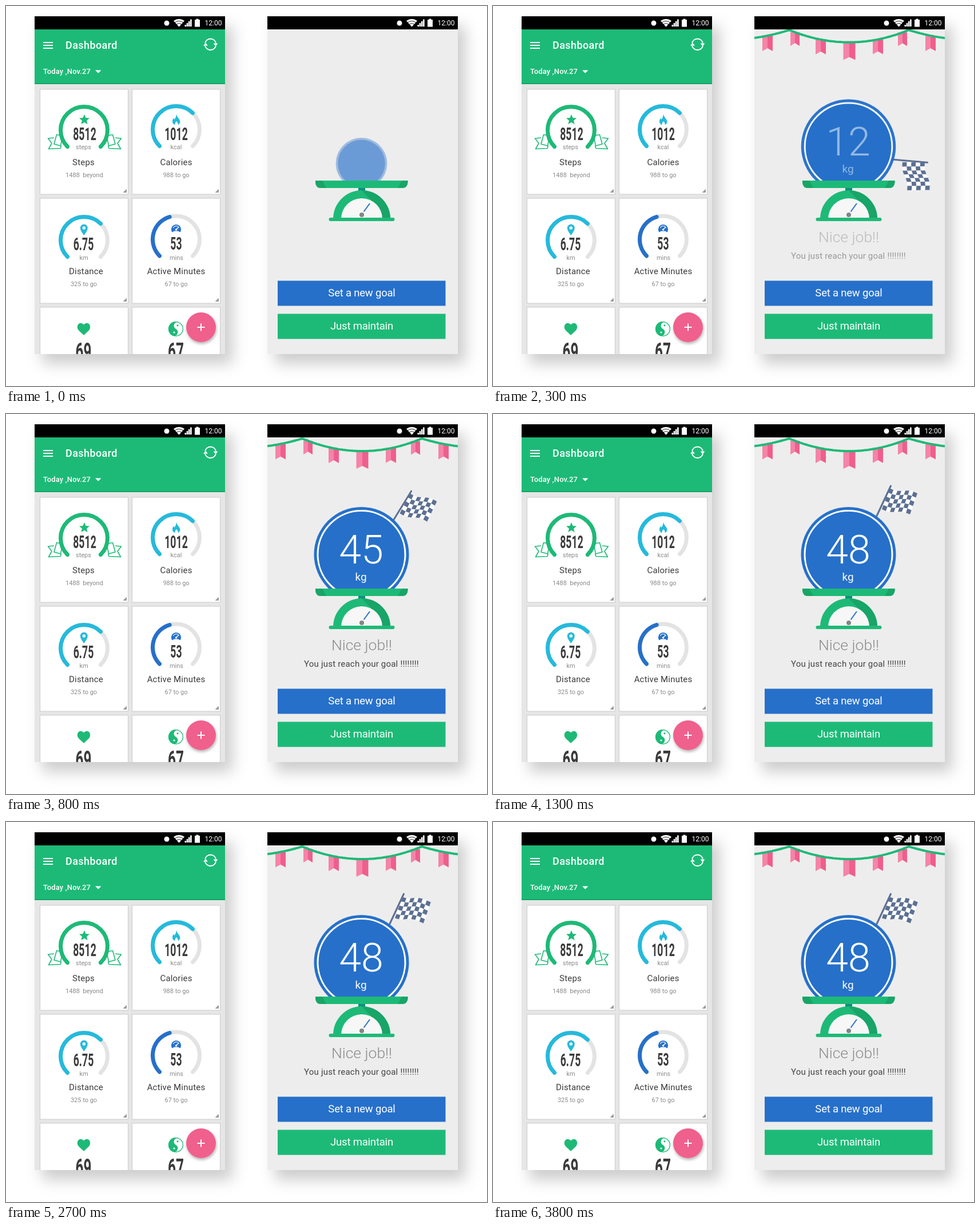
An HTML page that plays this animation: 841 px wide and 666 px high, repeating every 4000 ms.

```html
<!DOCTYPE html>
<html lang="en">
<head>
<meta charset="utf-8">
<title>Fitness dashboard</title>
<style>
html, body { margin: 0; width: 100%; height: 100%; overflow: hidden; background: #fff; }
svg { display: block; width: 841px; height: 666px; font-family: Roboto, "Open Sans", sans-serif; }
</style>
</head>
<body>
<svg id="stage" viewBox="0 0 841 666" xmlns="http://www.w3.org/2000/svg"></svg>
<script>
const GREEN = '#1dba77', DARK_GREEN = '#18a567', BLUE = '#2670ca', CYAN = '#25badb', INK = '#3b3b3b';
const stage = document.getElementById('stage');

const rect = (x, y, w, h, fill, extra = '') =>
  `<rect x="${x}" y="${y}" width="${w}" height="${h}" fill="${fill}" ${extra}/>`;
const circle = (x, y, r, fill, extra = '') =>
  `<circle cx="${x}" cy="${y}" r="${r}" fill="${fill}" ${extra}/>`;
const path = (d, fill = 'none', extra = '') => `<path d="${d}" fill="${fill}" ${extra}/>`;
const stroke = (d, color, width, extra = '') =>
  path(d, 'none', `stroke="${color}" stroke-width="${width}" ${extra}`);
const text = (x, y, size, fill, str, extra = '') =>
  `<text x="${x}" y="${y}" font-size="${size}" fill="${fill}" xml:space="preserve" ${extra}>${str}</text>`;
const MID = 'text-anchor="middle"';
const SPACED = MID + ' letter-spacing=".2"';

// Condensed figures used on the cards
const figure = (x, y, size, str) =>
  `<text transform="translate(${x} ${y}) scale(.58 1)" font-size="${size}" font-weight="700" fill="${INK}" ${MID}>${str}</text>`;

function polar(cx, cy, r, deg) {
  const a = deg * Math.PI / 180;
  return [cx + r * Math.cos(a), cy + r * Math.sin(a)];
}

function arc(cx, cy, r, from, to) {
  const big = to - from > 180 ? 1 : 0;
  return `M${polar(cx, cy, r, from)}A${r} ${r} 0 ${big} 1 ${polar(cx, cy, r, to)}`;
}

function gauge(cx, cy, end, color) {
  const cap = 'stroke-linecap="round"';
  return stroke(arc(cx, cy, 41, 135, 405), '#e3e3e3', 7, cap) +
    stroke(arc(cx, cy, 41, 135, end), color, 7, cap);
}

function star(cx, cy, r) {
  const pts = [];
  for (let i = 0; i < 10; i++) pts.push(polar(cx, cy, i % 2 ? r * .45 : r, i * 36 - 90));
  return `<polygon points="${pts.join(' ')}" fill="${GREEN}"/>`;
}

function statusBar(x) {
  let bars = '';
  for (let i = 0; i < 4; i++) bars += rect(x + 262.5 + i * 3.2, 33 - i * 3.2, 2.6, 3 + i * 3.2, '#fff');
  return rect(x, 18, 333, 23, '#000') +
    circle(x + 231, 30, 4.5, '#fff') +
    path(`M${x + 252.5} 36.5L${x + 243} 26Q${x + 252.5} 19.5 ${x + 262} 26Z`, '#fff') +
    stroke(`M${x + 245} 29.2Q${x + 252.5} 23.4 ${x + 260} 29.2M${x + 248} 32.4Q${x + 252.5} 28.8 ${x + 257} 32.4`, '#000', .9) +
    bars +
    rect(x + 282.5, 22.5, 4, 2, '#fff') + rect(x + 280, 24, 9, 12.5, '#fff') +
    text(x + 297.5, 34, 12, '#fff', '12:00');
}

function card(x, y) {
  return rect(x + .5, y + .5, 154, 184, '#fff', 'stroke="#cbcbcb"') +
    path(`M${x + 152} ${y + 175}v6.5h-6.5Z`, '#9a9a9a');
}

function label(x, y, title, subX, sub) {
  return text(x, y, 15, INK, title, SPACED) + text(subX, y + 21, 11, '#8a8a8a', sub, MID);
}
const unit = (x, y, str) => text(x, y, 11, '#8a8a8a', str, MID);

function ribbon() {
  const half = 'M84 231L73.5 232L80 240.5L74.5 250.5L95 249.5L96.5 245' +
    'M88.5 225.5L99 227.5L95.5 245L84 242Z';
  const line = stroke(half, GREEN, 1.6, 'stroke-linejoin="round"');
  return line + `<g transform="translate(275 0) scale(-1 1)">${line}</g>`;
}

function header() {
  let menu = '';
  for (let i = 0; i < 3; i++) menu += rect(65, 63 + i * 5, 17, 2, '#fff');
  const sync = stroke(arc(357.5, 67.3, 9.8, 195, 345) + arc(357.5, 67.3, 9.8, 15, 165), '#fff', 2) +
    path('M345 69.5h8l-4-5ZM362.5 65.5h8l-4 5Z', '#fff');
  return rect(50, 41, 333, 96, GREEN) + rect(50, 135, 333, 2, '#16a468') + menu + sync +
    text(104, 75, 18, '#fff', 'Dashboard', 'font-weight="500" letter-spacing=".4"') +
    text(65, 119, 13, '#fff', 'Today ,Nov.27', 'font-weight="500" letter-spacing=".15"') +
    path('M156 112.5h10.5l-5.25 5.2Z', '#fff');
}

function dashboard() {
  let cards = '';
  for (const y of [146, 337, 528]) cards += card(59, y - .5) + card(220, y - .5);
  const steps = gauge(136.5, 217.5, 405, GREEN) + ribbon() + star(137, 199.5, 9.5) +
    figure(137.5, 235, 30.5, '8512') + unit(135.5, 251, 'steps') +
    label(135.5, 279, 'Steps', 137, '1488&#160; beyond');
  const calories = gauge(297.5, 216.5, 315, CYAN) +
    path('M298 189.5C299 196 304 197 304.5 203Q304 207 300.5 208.5Q301.500 205 298 202Q295 205 295.500 208.5Q290.500 206.500 291 201Q291.500 198 293 196.500L294.500 199Q297.500 195 298 189.5Z', CYAN) +
    figure(297.5, 235, 30.5, '1012') + unit(297.5, 251, 'kcal') +
    label(297.5, 279, 'Calories', 297.5, '988 to go');
  const distance = gauge(136.5, 410.5, 315, CYAN) +
    path('M136.3 402Q129.800 393.500 129.800 389A6.500 6.500 0 0 1 142.800 389Q142.800 393.500 136.300 402Z', CYAN) +
    circle(136.3, 389, 2.7, '#fff') +
    figure(135.5, 428, 30.5, '6.75') + unit(136, 445, 'km') +
    label(140, 470, 'Distance', 136, '325 to go');
  const active = gauge(297.5, 409, 254, BLUE) +
    path('M290.500 396.500A8.600 8.600 0 1 1 304.500 396.500L301 394.500H294Z', BLUE) +
    stroke(arc(297.5, 390.5, 5, 195, 345), '#fff', 1.2) +
    stroke('M297.500 392L301 388', '#fff', 1.3) + circle(297.5, 392, 1.7, '#fff') +
    figure(297.5, 427, 30.5, '53') + unit(298, 445, 'mins') +
    label(297.5, 470, 'Active Minutes', 297.5, '67 to go');
  const heart = path('M136 577L127 568.500C120.500 560 129.500 551 136 558.500C142.500 551 151.500 560 145 568.500Z', GREEN);
  const yin = circle(297, 566, 12.4, '#fff', `stroke="${GREEN}" stroke-width="1.3"`) +
    `<g transform="rotate(28 297 566)">` +
    path('M297 553A13 13 0 0 0 297 579A6.500 6.500 0 0 0 297 566A6.500 6.500 0 0 1 297 553Z', GREEN) + '</g>' +
    circle(300, 559.8, 1.6, GREEN) + circle(294, 572, 1.6, '#fff');
  const add = circle(341, 563, 26, '#f0608d', 'filter="url(#lift)"') +
    rect(334.5, 562, 13, 2, '#fff') + rect(340, 556.5, 2, 13, '#fff');
  return rect(50, 18, 333, 592, '#e6e6e6', 'filter="url(#shade)"') +
    `<g clip-path="url(#left)">${header()}${cards}${steps}${calories}${distance}${active}${heart}${yin}` +
    figure(135.5, 620, 42, '69') + figure(297, 620, 42, '67') + add + '</g>' + statusBar(50);
}

function scale() {
  return rect(616, 318, 12, 8, '#0f8e83') +
    path('M572 373A50 50 0 0 1 672 373Z', GREEN) +
    path('M622 323A50 50 0 0 1 672 373H658A36 36 0 0 0 640 342Z', DARK_GREEN) +
    path('M586 373A36 36 0 0 1 658 373Z', '#f7f7f7') +
    rect(564.5, 371, 115, 6, GREEN, 'rx="3"') +
    stroke('M625.500 360.500L636 346', BLUE, 2) + circle(622, 366, 4, '#858585') +
    path('M541 306H702.500V309Q702 319 692 319H551Q541.500 319 541 309Z', GREEN) +
    path('M541 306H553L560 319H551Q541.500 319 541 309ZM702.500 306V309Q702 319 692 319H685L692 306Z', DARK_GREEN);
}

function button(y, fill, str) {
  return rect(475, y, 293.5, 44, fill) +
    text(622, y + 27.3, 18.5, '#fff', str, MID + ' letter-spacing="-.2"');
}

// Height of the garland rope; k is how far it still has to drop
function ropeY(x, k) {
  const mid = x > 518 && x < 727;
  const centre = mid ? 622.5 : x <= 518 ? 413.5 : 831.5;
  const sag = mid ? 22 - 2 * k : 16 + 4 * k;
  return 43 - 5 * k + sag * (1 - ((x - centre) / 104.5) ** 2);
}

function garland(k) {
  const flags = [[480, 18, 27], [528, 16, 24], [573, 18, 26], [623, 21, 31], [673, 18, 26], [716, 16, 24], [765, 18, 27]];
  const cloth = flags.map(([x, w, h]) => {
    const y = ropeY(x, k), l = x - w / 2, b = y + h;
    return path(`M${l} ${y}H${x}V${b - 5}L${l} ${b}Z`, '#f584a8') +
      path(`M${x} ${y}H${l + w}V${b}L${x} ${b - 5}Z`, '#ef5e8c');
  }).join('');
  const rope = [];
  for (let x = 457; x <= 790; x += 3) rope.push([x, ropeY(x, k).toFixed(1)]);
  return cloth + stroke('M' + rope.join('L'), GREEN, 4, 'stroke-linejoin="round"');
}

function flag(phase) {
  const cols = 7, rows = 5;
  const at = (i, j) => [
    693 + 49 * i / cols - 13 * j / rows + phase * i / cols,
    130 + 9 * i / cols + 37 * j / rows + 2.2 * Math.sin(i / cols * 2 * Math.PI + phase)
  ];
  let dark = '', edge = [];
  for (let i = 0; i < cols; i++)
    for (let j = 0; j < rows; j++)
      if ((i + j) % 2 === 0) dark += `M${at(i, j)}L${at(i + 1, j)}L${at(i + 1, j + 1)}L${at(i, j + 1)}Z`;
  for (let i = 0; i <= cols; i++) edge.push(at(i, 0));
  for (let i = cols; i >= 0; i--) edge.push(at(i, rows));
  return path('M' + edge.join('L') + 'Z', '#fff') + path(dark, '#5d7092') +
    stroke('M667 187L695.500 126', '#5d7092', 3, 'stroke-linecap="round"');
}

stage.innerHTML = `<defs>
  <filter id="shade" x="-20%" y="-20%" width="150%" height="150%"><feDropShadow dx="13" dy="17" stdDeviation="13" flood-opacity=".2"/></filter>
  <filter id="lift" x="-30%" y="-30%" width="160%" height="170%"><feDropShadow dx="1" dy="3" stdDeviation="2.5" flood-opacity=".3"/></filter>
  <clipPath id="left">${rect(50, 18, 333, 592, '#000')}</clipPath>
  <clipPath id="right">${rect(457, 41, 333, 569, '#000')}</clipPath>
  <clipPath id="tray">${rect(457, 41, 333, 269, '#000')}</clipPath>
</defs>` + dashboard() +
  rect(457, 18, 333, 592, '#ededed', 'filter="url(#shade)"') +
  `<g clip-path="url(#right)"><g id="garland"></g><g id="flag"></g></g>
  <g clip-path="url(#tray)"><g id="disc">` +
  circle(0, 0, 83, BLUE, 'id="rim"') + circle(0, 0, 76.5, BLUE, 'id="face"') +
  circle(0, 0, 76.5, 'none', 'id="ring" stroke="#fff" stroke-width="3"') + '</g></g>' + scale() +
  '<g id="words">' + text(621, 262, 70, '#fff', '', MID + ' font-weight="300" id="count"') +
  text(620.5, 292, 19, '#fff', 'kg', MID) +
  text(622, 414, 26.5, '#8c8c8c', 'Nice job!!', MID + ' font-weight="300"') +
  text(621.5, 443, 15, '#444', 'You just reach your goal !!!!!!!!', SPACED) + '</g>' +
  button(481.5, BLUE, 'Set a new goal') + button(539.5, GREEN, 'Just maintain') + statusBar(457);

const el = {};
for (const id of ['garland', 'flag', 'disc', 'rim', 'face', 'ring', 'words', 'count'])
  el[id] = document.getElementById(id);

function draw(ms) {
  const n = Math.floor(ms / 100);

  const size = 1 - .46 * .18 ** n;
  el.disc.setAttribute('transform', `translate(621.5 ${311 - 65 * size}) scale(${size})`);
  el.rim.setAttribute('opacity', 1 - .61 * .4 ** n);
  el.face.setAttribute('opacity', 1 - .57 * .4 ** n);
  el.ring.setAttribute('opacity', 1 - .4 ** n);

  el.garland.innerHTML = n ? garland(5 ** (2 - n)) : '';

  // The counter and the flag settle together
  const left = Math.max(0, 1 - Math.max(0, n - 2) / 9) ** 2.42;
  el.words.setAttribute('opacity', Math.min(1, Math.max(0, (n - 2) / 2)));
  el.count.textContent = Math.round(48 * (1 - left));
  const phase = n < 22 ? 0 : n < 27 ? .4 : .8;
  el.flag.innerHTML = n > 2 ? flag(phase) : '';
  el.flag.setAttribute('transform', `rotate(${93 * left} 621.5 246)`);
}

const start = performance.now();
let shown = -1;
function tick() {
  const ms = (performance.now() - start) % 4000;
  const step = Math.floor(ms / 100);
  if (step !== shown) draw(ms);
  shown = step;
  requestAnimationFrame(tick);
}
tick();
</script>
</body>
</html>
```
